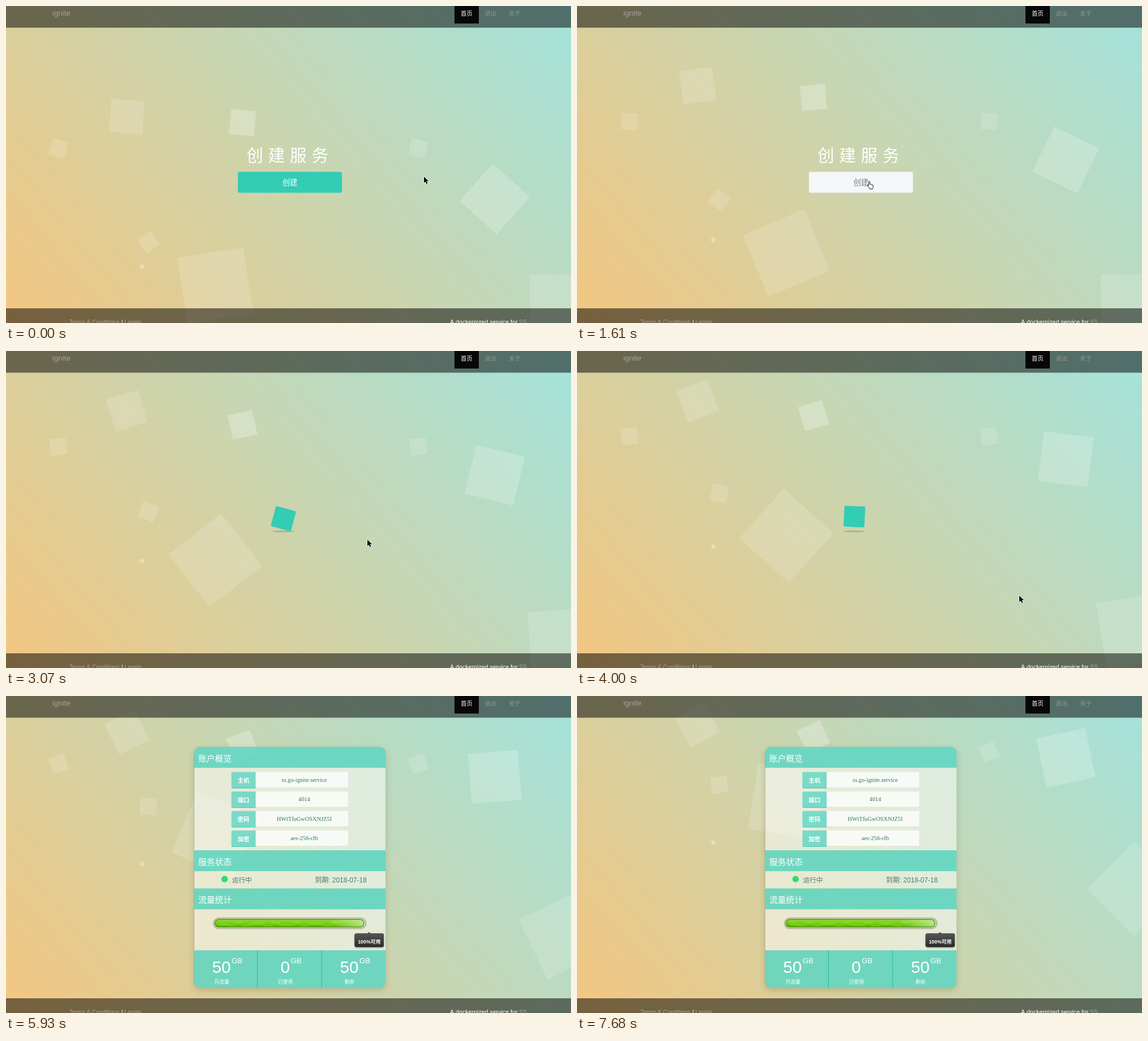
These frames come from a looping animation (999x561 px, 7.78 s). An HTML page with a canvas:

```html
<!DOCTYPE html>
<html lang="zh-CN">
<head>
<meta charset="utf-8">
<title>ignite</title>
<style>
html, body { margin: 0; width: 100%; height: 100%; overflow: hidden; background: #cbd4ab; }
canvas { display: block; }
</style>
</head>
<body>
<canvas id="stage" width="999" height="561"></canvas>
<script>
const W = 999, H = 561, LOOP = 7780;
const ctx = document.getElementById('stage').getContext('2d');
const SANS = '"Liberation Sans", "Noto Sans CJK SC", "Noto Sans CJK", sans-serif';
const CJK = '"Noto Sans CJK SC", "Noto Sans CJK", sans-serif';
const SERIF = '"Liberation Serif", serif';
const TEAL = '#33ccb5';

const MARKS = [0, 150, 1070, 1250, 1610, 1750, 2290, 2470, 3070, 3250, 3430, 3610, 4000,
  4200, 4590, 4770, 4950, 5160, 5750, 5930, 6140, 6920, 7120, 7680];
const steps = [];
MARKS.forEach((a, i) => {
  const b = MARKS[i + 1] ?? LOOP;
  const n = Math.max(1, Math.round((b - a) / 190));
  for (let k = 0; k < n; k++) steps.push(a + (b - a) * k / n);
});
const hold = t => steps.filter(s => s <= t + 0.5).pop() ?? 0;

const clamp = v => Math.min(1, Math.max(0, v));
const mix = (a, b, p) => a + (b - a) * p;

// cubic-bezier(.25, .1, .25, 1)
function ease(x) {
  if (x <= 0) return 0;
  if (x >= 1) return 1;
  const bez = (a, b, u) => 3 * a * u * (1 - u) ** 2 + 3 * b * u * u * (1 - u) + u ** 3;
  let lo = 0, hi = 1;
  for (let i = 0; i < 30; i++) {
    const m = (lo + hi) / 2;
    if (bez(.25, .25, m) < x) lo = m; else hi = m;
  }
  return bez(.1, 1, lo);
}

function text(c, str, x, y, size, color, opt = {}) {
  c.font = `${opt.weight || 400} ${size}px ${opt.family || SANS}`;
  c.textAlign = opt.align || 'left';
  c.textBaseline = 'alphabetic';
  c.fillStyle = color;
  c.fillText(str, x, y);
}
// Han text placed by its vertical middle
function han(c, str, x, mid, size, color, opt = {}) {
  text(c, str, x, mid + size * .38, size, color, { family: CJK, ...opt });
}
function box(c, x, y, w, h, fill, r = 0) {
  c.beginPath();
  c.roundRect(x, y, w, h, r);
  c.fillStyle = fill;
  c.fill();
}
function ramp(c, x0, y0, x1, y1, ...stops) {
  const g = c.createLinearGradient(x0, y0, x1, y1);
  stops.forEach((s, i) => g.addColorStop(i / (stops.length - 1), s));
  return g;
}

// left %, size, delay s, duration s, opacity
const BUBBLES = [
  [10, 40, 0, 25, .15], [20, 80, 2, 17, .15], [25, 40, 4, 25, .15], [40, 60, 0, 22, .25],
  [70, 40, 0, 25, .15], [80, 120, 3, 25, .2], [32, 160, 7, 25, .15], [55, 20, 15, 40, .15],
  [25, 10, 2, 40, .3], [90, 160, 11, 25, .15]
];
const ZOOM = .7375, AGE = 9.17;

const sky = ramp(ctx, 105.6, 472.4, 967.4, -251, '#f3c680', '#a3e3dc');
(() => {
  // axis at 50 degrees from vertical, spanning the lower left to upper right corners
  const ux = .766, uy = -.643, len = W * ux - H * uy;
  sky.axis = [0, H, ux * len, H + uy * len];
})();
const backdrop = ramp(ctx, ...sky.axis, '#f3c680', '#a3e3dc');

function drawBackground(t) {
  ctx.fillStyle = backdrop;
  ctx.fillRect(0, 0, W, H);
  BUBBLES.forEach(([left, size, delay, dur, alpha], i) => {
    const s = size * ZOOM, p = ease((t / 1000 + AGE - delay) / dur);
    const fade = i ? 1 : 1 - clamp((t - 6100) / 900);
    ctx.save();
    ctx.translate(-28 + 10.6 * left + s / 2, 593 - s / 2 - 700 * ZOOM * p);
    ctx.rotate(-120 * p * Math.PI / 180);
    ctx.fillStyle = `rgba(255,255,255,${alpha * fade})`;
    ctx.fillRect(-s / 2, -s / 2, s, s);
    ctx.restore();
  });
}

function drawBars() {
  ctx.fillStyle = 'rgba(0,0,0,.51)';
  ctx.fillRect(0, 0, W, 38.4);
  ctx.fillRect(0, 535, W, 26);
  text(ctx, 'ignite', 82, 17, 13.3, '#a3a39c');
  box(ctx, 793, 0, 43, 31, '#080808');
  han(ctx, '首页', 804, 13, 10.4, '#fff');
  han(ctx, '退出', 846.5, 13, 10.4, '#94968f');
  han(ctx, '关于', 889, 13, 10.4, '#94968f');
  text(ctx, 'Terms & Conditions', 112, 562.5, 10.2, '#aaa392');
  text(ctx, '|', 204, 562.5, 10.2, '#fff');
  text(ctx, 'Legals', 209.5, 562.5, 10.2, '#aaa392');
  text(ctx, 'A dockernized service for', 785, 562.5, 10.65, '#fff');
  text(ctx, 'SS', 907, 562.5, 10.5, '#a0aca0');
}

function drawForm(hover) {
  [...'创建服务'].forEach((ch, i) =>
    han(ctx, ch, 440 + 38.35 * i, 264, 29.5, '#fff', { align: 'center', weight: 500 }));
  box(ctx, 410, 293.5, 184, 37, hover ? '#f4f6f9' : TEAL, 2.5);
  han(ctx, '创建', 502, 312, 13.3, hover ? '#7c7f80' : '#fff', { align: 'center' });
}

function drawLoader(t) {
  let p = ((t - 3070) / 500 + .167) % 1;
  if (p < 0) p += 1;
  const dip = 1 - Math.abs(2 * p - 1), s = 50 * ZOOM;
  ctx.beginPath();
  ctx.ellipse(490.5, 319.2, s / 2 * (1 + .2 * dip), 1.85, 0, 0, 7);
  ctx.fillStyle = 'rgba(0,0,0,.14)';
  ctx.fill();
  ctx.save();
  ctx.translate(490.5, 292.3 + 18 * ZOOM * dip);
  ctx.scale(1, p > .25 && p < .75 ? 1 - .1 * (2 * dip - 1) : 1);
  ctx.rotate(p * Math.PI / 2);
  const soft = mix(3, 40, clamp((dip - .34) / .66)) * ZOOM;
  box(ctx, -s / 2, -s / 2, s, s, TEAL, [2.2, 2.2, soft, 2.2]);
  ctx.restore();
}

function drawMeter(c) {
  box(c, 366, 392, 271.5, 20.5, 'rgba(70,100,40,.36)', 10.2);
  box(c, 368, 394, 267.5, 16.5, 'rgba(205,222,175,.75)', 8.2);
  box(c, 369, 395, 264, 14.3, '#3f7414', 7.1);
  box(c, 370, 396, 262, 12.3, ramp(c, 0, 396, 0, 408, '#93d834', '#74cf0a', '#58b400'), 6.1);
  c.save();
  c.clip();
  c.fillStyle = ramp(c, 570, 0, 633, 0, 'rgba(220,245,190,0)', 'rgba(220,245,190,.65)');
  c.fillRect(570, 396, 63, 13);
  c.fillStyle = 'rgba(200,245,120,.16)';
  for (let i = 0; i < 16; i++) {
    c.beginPath();
    c.ellipse(385 + i * 13, 404 + 3 * Math.sin(i * 2.4), 9, 2.5, 0, 0, 7);
    c.fill();
  }
  c.restore();
}

function drawTip(c) {
  c.save();
  c.shadowColor = 'rgba(0,0,0,.35)';
  c.shadowBlur = 3;
  c.shadowOffsetY = 1;
  box(c, 616.5, 420, 51.5, 24.3, '#333', 3.5);
  c.restore();
  c.beginPath();
  c.moveTo(638, 421);
  c.lineTo(642, 417.8);
  c.lineTo(646, 421);
  c.fillStyle = '#4a4d48';
  c.fill();
  box(c, 616.5, 420, 51.5, 24.3, ramp(c, 0, 420, 0, 444, '#555', '#414141', '#2a2a2a'), 3.5);
  text(c, '100%可用', 642.3, 438.3, 8.85, '#fff', { align: 'center', weight: 700 });
}

function makePanel() {
  const cv = document.createElement('canvas');
  cv.width = W;
  cv.height = H;
  const c = cv.getContext('2d');
  const shape = new Path2D();
  shape.roundRect(332.5, 90, 338.5, 427, 12);

  // shadow kept outside the translucent card
  c.save();
  const outside = new Path2D();
  outside.rect(0, 0, W, H);
  outside.addPath(shape);
  c.clip(outside, 'evenodd');
  c.shadowColor = 'rgba(70,60,30,.2)';
  c.shadowBlur = 12;
  c.shadowOffsetY = 4;
  c.fill(shape);
  c.restore();

  c.save();
  c.clip(shape);
  c.fillStyle = 'rgba(255,255,255,.5)';
  c.fillRect(332, 90, 340, 428);
  c.fillStyle = 'rgba(51,204,181,.67)';
  [[90, 37], [273, 37], [340.5, 37], [450, 67]].forEach(([y, h]) => c.fillRect(332, y, 340, h));
  c.fillStyle = '#27b9a3';
  c.fillRect(444, 450, 1, 67);
  c.fillRect(557.5, 450, 1, 67);
  c.restore();

  [['账户概览', 110], ['服务状态', 293], ['流量统计', 360.3]].forEach(([s, y]) =>
    han(c, s, 340, y, 14.75, '#fff'));

  [['主机', 'ss.go-ignite.service'], ['端口', '4014'],
   ['密码', 'HWtTfuGwOSXNJZ5I'], ['加密', 'aes-256-cfb']].forEach(([label, value], i) => {
    const y = 134.5 + 34.5 * i;
    box(c, 441, y, 164, 27, 'rgba(255,255,255,.75)', [0, 2, 2, 0]);
    box(c, 398.5, y, 43, 29, 'rgba(70,210,190,.68)', [2, 0, 0, 2]);
    c.fillStyle = 'rgba(40,180,155,.5)';
    c.fillRect(399, y + 28, 42, 1);
    han(c, label, 420, y + 14.7, 10.4, '#fff', { align: 'center', weight: 700 });
    text(c, value, 527.3, y + 17, 10.35, '#2b7a62', { align: 'center', family: SERIF });
  });

  c.beginPath();
  c.arc(386.5, 324, 5.7, 0, 7);
  c.fillStyle = '#2edc70';
  c.fill();
  han(c, '运行中', 399.5, 325.3, 11.8, '#42806a');
  text(c, '到期: 2018-07-18', 637.8, 329.5, 11.95, '#42806a', { align: 'right' });

  drawMeter(c);
  drawTip(c);

  [['50', 364.5, 399, '月流量', 381.5], ['0', 485.5, 503.5, '已使用', 494],
   ['50', 590.5, 625, '剩余', 607.3]].forEach(([n, x, unit, label, mid]) => {
    text(c, n, x, 489.5, 29.5, '#fff');
    text(c, 'GB', unit, 473, 13.3, '#fff');
    han(c, label, mid, 505.3, 8.85, '#fff', { align: 'center' });
  });
  return cv;
}
const panel = makePanel();

// time, x, y of the pointer tip
const ROUTE = [[0, 739, 302], [150, 739, 302], [1250, 515, 310], [2290, 515, 310],
  [3070, 639, 334], [4000, 782, 433], [4950, 785, 428], [5350, 785, 428]];
const ARROW = new Path2D('M0 0V11.2L2.6 8.8L4.4 13L6.4 12.1L4.6 8.1H8.2Z');
const HAND = new Path2D('M3.2 8.2V1.8a1.1 1.1 0 0 1 2.2 0V6q1.6-1 2.2.5q1.5-.7 2 .6' +
  'q1.6-.4 1.6 1.2v2.2q-.3 1.4-1 2.2v1.4H5v-1.2Q2.4 9.9 1.2 8.3Q.6 7 1.8 7q.8.2 1.4 1.2z');

function pointer(t) {
  const i = ROUTE.findIndex(k => k[0] > t);
  if (i < 1) return null;
  const [t0, x0, y0] = ROUTE[i - 1], [t1, x1, y1] = ROUTE[i];
  let p = (t - t0) / (t1 - t0);
  p = p * p * (3 - 2 * p);
  return [mix(x0, x1, p), mix(y0, y1, p)];
}

function drawPointer([x, y], hand) {
  ctx.save();
  ctx.translate(hand ? x - 2.5 : x, hand ? y - .3 : y);
  ctx.lineJoin = 'round';
  ctx.lineWidth = hand ? 1 : 1.6;
  ctx.strokeStyle = hand ? '#111' : '#fff';
  ctx.fillStyle = hand ? '#fff' : '#000';
  if (hand) ctx.fill(HAND);
  ctx.stroke(hand ? HAND : ARROW);
  if (!hand) ctx.fill(ARROW);
  ctx.restore();
}

function draw(t) {
  const at = pointer(t);
  const form = t < 2105;
  const hover = form && at && at[0] > 410 && at[0] < 594 && at[1] > 293 && at[1] < 331;
  drawBackground(t);
  if (form) drawForm(hover);
  else if (t < 4390) drawLoader(t);
  const shown = clamp((t - 4400) / 1020);
  if (shown) {
    ctx.globalAlpha = shown;
    ctx.drawImage(panel, 0, 0);
    ctx.globalAlpha = 1;
  }
  drawBars();
  if (at) drawPointer(at, hover);
}

const start = performance.now();
function tick() {
  draw(hold((performance.now() - start) % LOOP));
  requestAnimationFrame(tick);
}
tick();
</script>
</body>
</html>
```
